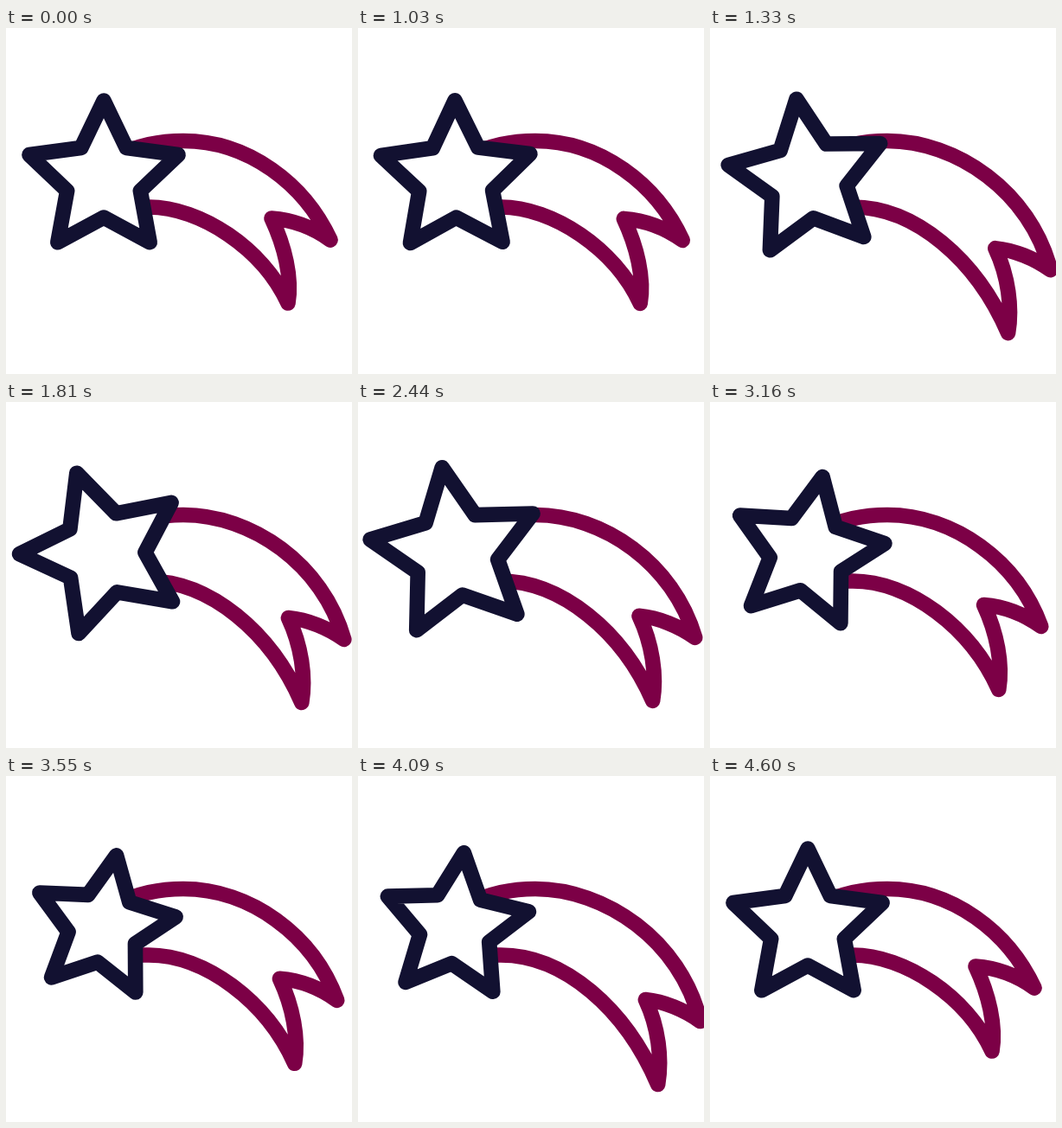
Animation, 400 px wide and 400 px high, one loop 4630 ms. Source, as an HTML page:

```html
<!DOCTYPE html>
<html lang="en">
<head>
<meta charset="utf-8">
<title>Shooting star</title>
<style>
html, body { margin: 0; width: 100%; height: 100%; overflow: hidden; background: #fff; }
svg { display: block; width: 100vw; height: 100vh; }
path { stroke-width: 17.6; stroke-linecap: round; stroke-linejoin: round; }
#tail { fill: none; stroke: #7c0046; }
#star { fill: #fff; stroke: #121131; }
</style>
</head>
<body>
<svg viewBox="0 0 400 400">
  <path id="tail"/>
  <path id="star"/>
</svg>
<script>
const LOOP = 4630, STEP = 30, HOLD = 1030;
const START = 1000, SWING = 600, END = START + 6 * SWING;
const RADIUS = 90.5, INNER = 44.5, CX = 113, CY = 174.5;
const tail = document.getElementById('tail');
const star = document.getElementById('star');

const smooth = bezier(1 / 3, 0, 2 / 3, 1);
const settle = bezier(1 / 3, 1 / 3, 2 / 3, 1);
const leave = bezier(1 / 3, 0, 2 / 3, 1 / 3);
const snap = bezier(.3, 0, .2, 1);

// Each move: end time, end value, easing
const spin = track(0, [2000, -20, settle], [3100, 11, smooth], [END, 0, leave]);
const size = track(1, [2400, 1.106, settle], [3700, .921, smooth], [END, 1, smooth]);

function bezier(x1, y1, x2, y2) {
  const at = (s, a, b) => 3 * (1 - s) * s * ((1 - s) * a + s * b) + s ** 3;
  return x => {
    let lo = 0, hi = 1;
    for (let i = 0; i < 24; i++) {
      const s = (lo + hi) / 2;
      if (at(s, x1, x2) < x) lo = s;
      else hi = s;
    }
    return at(lo, y1, y2);
  };
}

function track(first, ...moves) {
  return t => {
    let from = START, value = first;
    if (t <= from) return value;
    for (const [to, next, ease] of moves) {
      if (t < to) return value + (next - value) * ease((t - from) / (to - from));
      from = to;
      value = next;
    }
    return value;
  };
}

// The tail snaps out, then eases back, three times
function stretch(t) {
  if (t <= START || t >= END) return 0;
  const n = (t - START) / SWING, k = Math.floor(n);
  return k % 2 ? 1 - smooth(n - k) : snap(n - k);
}

// The forked end keeps its shape while the two long curves follow it
function tailPath(p) {
  const dx = 22 * p, dy = 41 * p, k = 5 * p;
  return `M130 147C152 136 178 130.5 205 130.5
    C${280 + dx / 4} 130.5 ${345 + 1.35 * dx} ${180 + dy / 4} ${375 + dx} ${245 + dy}
    c-18 -13 -42 -23 ${k - 68} -25
    c15 32 ${24 - k} 68 ${19 - k} 98
    C${297 + .6 * dx} ${255 + .37 * dy} ${225 + .65 * dx} 207 165 207H145`;
}

function starPath(scale, turn) {
  const pts = Array.from({ length: 10 }, (_, i) => {
    const a = i * Math.PI / 5 + turn * Math.PI / 180;
    const r = scale * (i % 2 ? INNER : RADIUS);
    return `${CX + r * Math.sin(a)} ${CY - r * Math.cos(a)}`;
  });
  return 'M' + pts.join('L') + 'Z';
}

function draw(now) {
  const time = now % LOOP;
  const t = time < HOLD ? 0 : HOLD + Math.floor((time - HOLD) / STEP) * STEP;
  tail.setAttribute('d', tailPath(stretch(t)));
  star.setAttribute('d', starPath(size(t), spin(t)));
}

const begin = performance.now();
function tick() {
  draw(performance.now() - begin);
  requestAnimationFrame(tick);
}
tick();
</script>
</body>
</html>
```
